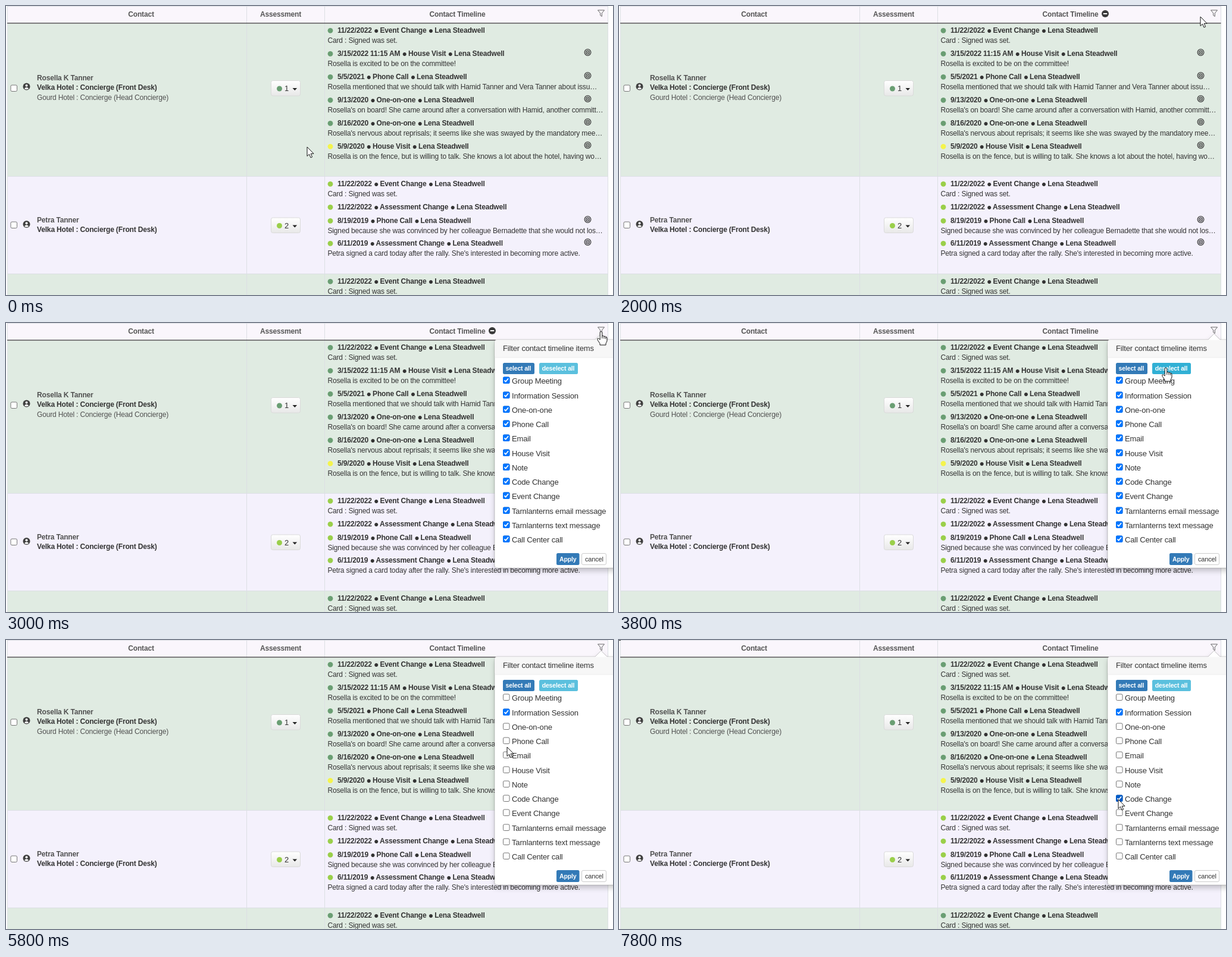
Write an HTML page that moves like this. It is 1020 by 486 pixels and loops after 8 s.

```html
<!DOCTYPE html>
<html lang="en">
<head>
<meta charset="utf-8">
<title>Contact timeline</title>
<style>
  html, body { margin: 0; width: 100%; height: 100%; overflow: hidden; background: #fff; }
  svg { display: block; }
  text { font: 12px "Liberation Sans", Arial, sans-serif; letter-spacing: -.16px; fill: #333; white-space: pre; }
  .b { font-weight: bold; }
  .grey { fill: #505050; }
  .mid { font-size: 13px; }
  .small { font-size: 11px; }
  .label { font-size: 10.5px; font-weight: bold; fill: #fff; text-anchor: middle; }
  .head { font-weight: bold; fill: #555; text-anchor: middle; }
  .bullet { font-size: 14px; letter-spacing: -1.2px; baseline-shift: -.8px; }
</style>
</head>
<body>
<svg id="stage" width="1020" height="486" viewBox="0 0 1020 486"></svg>
<script>
const GREEN = '#6a9e73', LIME = '#9acf4a', YELLOW = '#f4f44c';
const HOST = 'Lena Steadwell';

const rect = (x, y, w, h, fill, more = '') =>
  `<rect x="${x}" y="${y}" width="${w}" height="${h}" fill="${fill}" ${more}/>`;
const dot = (x, y, r, fill, more = '') => `<circle cx="${x}" cy="${y}" r="${r}" fill="${fill}" ${more}/>`;
const path = (d, fill, more = '') => `<path d="${d}" fill="${fill}" ${more}/>`;
const text = (x, y, s, cls = '') => `<text x="${x}" y="${y}" class="${cls}">${s}</text>`;
const group = (id, body) => `<g id="${id}">${body}</g>`;

const target = (x, y) => dot(x, y, 5.3, 'none', 'stroke="#3c3c3c" stroke-width="1.3"') +
  dot(x, y, 2.9, 'none', 'stroke="#3c3c3c" stroke-width="1.3"') + dot(x, y, 1.2, '#3c3c3c');
const badge = (x, y, plus) => dot(x, y, 6, '#3a3a3a') +
  path(`M${x - 3.2} ${y}h6.4` + (plus ? `M${x} ${y - 3.2}v6.4` : ''), 'none', 'stroke="#fff" stroke-width="2"');
const person = (x, y) => dot(x, y, 6, '#3f3f3f') + dot(x, y - 1.8, 2, '#fff') +
  path(`M${x - 3.6} ${y + 3.4}q3.6 -4.4 7.2 0q-3.6 2.6 -7.2 0z`, '#fff');
const box = (x, y) => rect(x - 5, y - 5, 10.5, 10.5, '#fff', 'rx="2" stroke="#767676"');

// Entry: baseline, dot colour, date, kind, note, has target icon
const entries = [
  [45, GREEN, '11/22/2022', 'Event Change', 'Card : Signed was set.'],
  [84, GREEN, '3/15/2022 11:15 AM', 'House Visit', 'Rosella is excited to be on the committee!', 1],
  [123, GREEN, '5/5/2021', 'Phone Call', 'Rosella mentioned that we should talk with Hamid Tanner and Vera Tanner about issu…', 1],
  [162, GREEN, '9/13/2020', 'One-on-one', "Rosella's on board! She came around after a conversation with Hamid, another committ…", 1],
  [201, GREEN, '8/16/2020', 'One-on-one', "Rosella's nervous about reprisals; it seems like she was swayed by the mandatory mee…", 1],
  [240, YELLOW, '5/9/2020', 'House Visit', 'Rosella is on the fence, but is willing to talk. She knows a lot about the hotel, having wo…', 1],
  [303, LIME, '11/22/2022', 'Event Change', 'Card : Signed was set.'],
  [342, LIME, '11/22/2022', 'Assessment Change', ''],
  [365, LIME, '8/19/2019', 'Phone Call', 'Signed because she was convinced by her colleague Bernadette that she would not los…', 1],
  [403, LIME, '6/11/2019', 'Assessment Change', "Petra signed a card today after the rally. She's interested in becoming more active.", 1],
  [467, GREEN, '11/22/2022', 'Event Change', 'Card : Signed was set.'],
];
const entry = ([y, color, date, kind, note, icon]) =>
  dot(545, y - 3.7, 4.4, color) +
  text(557, y, [date, kind, HOST].join(' <tspan class="bullet">●</tspan> '), 'b') +
  text(540.5, y + 17, note) + (icon ? target(977.5, y - 6) : '');

const rating = (y, color, n) =>
  rect(445.5, y - 13, 49, 25.5, 'url(#btn)', 'rx="3" stroke="#dadada"') + dot(459.5, y + .5, 4.5, color) +
  text(468, y + 4.5, n, 'mid') + path(`M481.5 ${y - .5}h7.6l-3.8 4z`, '#222');

const table =
  rect(2, 0, 1009.5, 28, '#faf6fc') + rect(2, 30, 1009.5, 257, '#e0ebe2') +
  rect(2, 287, 1009.5, 163, '#f4f1fc') + rect(2, 450, 1009.5, 36, '#e0ebe2') +
  path('M2.5 0V486M404.5 0V486M535.5 0V486M1011.5 0V486M2 .5H1011M2 286.5H1011M2 450.5H1011', 'none', 'stroke="#dcdfe4"') +
  rect(2, 28, 1009.5, 1.7, '#666') +
  text(227, 18, 'Contact', 'head') + text(461.5, 18, 'Assessment', 'head') + text(758.5, 18, 'Contact Timeline', 'head') +
  path('M994.5 7H1005.5L1001.3 12V17.5L998.7 15.8V12Z', 'none', 'stroke="#666"') +
  box(13, 138) + person(34.5, 135.5) +
  text(52, 125, 'Rosella K Tanner', 'b grey') + text(52, 141, 'Velka Hotel : Concierge (Front Desk)', 'b') +
  text(52, 158, 'Gourd Hotel : Concierge (Head Concierge)', 'grey') +
  box(13, 368) + person(34.5, 367) +
  text(52, 364, 'Petra Tanner', 'b grey') + text(52, 380, 'Velka Hotel : Concierge (Front Desk)', 'b') +
  rating(138.5, GREEN, 1) + rating(369, LIME, 2);

const edge = 'stroke="#000" stroke-opacity=".2"';
const note =
  path('M288 125.5H526q4 0 4 4V162L540 172L530 182V222q0 4 -4 4H288q-4 0 -4 -4V129.5q0 -4 4 -4z', '#fff', edge + ' filter="url(#shade)"') +
  rect(284.5, 126, 245, 26, '#f7f7f7', 'rx="3"') + rect(284.5, 152, 245, 1, '#ebebeb') +
  text(297, 144, 'One-on-one — 9/13/2020', 'mid') +
  ["Rosella's on board! She came around", 'after a conversation with Hamid,', 'another committee in her department.']
    .map((s, i) => text(297, 176 + 18 * i, s, 'mid')).join('');

const kinds = ['Group Meeting', 'Information Session', 'One-on-one', 'Phone Call', 'Email', 'House Visit', 'Note',
  'Code Change', 'Event Change', 'Tarnlanterns email message', 'Tarnlanterns text message', 'Call Center call'];
const rowY = i => Math.round(96.3 + 24.27 * i);
const tick = (i, y) => group('tick' + i, rect(835, y - 5.5, 11.5, 11.5, '#0075ff', 'rx="2"') +
  path(`M837.5 ${y + .3}l2.2 2.4l4.4 -5.4`, 'none', 'stroke="#fff" stroke-width="1.8"'));
const filter =
  path('M825 28H990L1000 18L1010 28H1030V412H825q-4 0 -4 -4V32q0 -4 4 -4z', '#fff', edge + ' filter="url(#shade)"') +
  rect(821.5, 28.5, 199, 29, '#f7f7f7', 'rx="3"') + rect(821.5, 57.5, 199, 1, '#ebebeb') +
  text(835, 47, 'Filter contact timeline items', 'mid') +
  rect(835, 67, 53, 19, '#337ab7', 'rx="2.5"') + text(861, 80, 'select all', 'label') +
  rect(896, 67, 65, 19, '#5bc0de', 'rx="2.5" id="deselect"') + text(928, 80, 'deselect all', 'label') +
  kinds.map((s, i) => box(840.5, rowY(i)) + tick(i, rowY(i)) + text(850, rowY(i) + 6, s, 'mid')).join('') +
  rect(925, 387, 38.5, 20, '#337ab7', 'rx="2.5"') + text(944.3, 401, 'Apply', 'label') +
  rect(967.5, 387.5, 41, 19, '#fff', 'rx="2.5" stroke="#ccc"') + text(973, 401, 'cancel', 'small');

const pen = 'stroke="#111" stroke-width="1" stroke-linejoin="round"';
const arrow = path('M0 0V15.5L3.6 12.2L6 18L8.6 16.9L6.2 11.3H11Z', '#fff', pen);
const hand = path('M-1.8 1.5Q0 -1 1.8 1.5V8Q4 6.8 5 8.6Q7 7.6 7.8 9.4Q10 9 10 11.5V16Q9.4 18.5 8 20V23H-2V20.5L-6 14.5Q-7.2 11.5 -4.4 11.8L-1.8 14Z', '#fff', pen) +
  path('M1.8 8V12M5 8.6V12.4M7.8 9.4V12.8', 'none', pen);

const stage = document.getElementById('stage');
stage.innerHTML = `<defs>
  <linearGradient id="btn" x2="0" y2="1"><stop stop-color="#fff"/><stop offset="1" stop-color="#e8e8e8"/></linearGradient>
  <filter id="shade" x="-10%" y="-10%" width="120%" height="125%"><feDropShadow dx="0" dy="5" stdDeviation="4.5" flood-opacity=".2"/></filter>
  </defs>` + table + rect(537, 0, 471, 37, '#dce5dc', 'id="glow"') + entries.map(entry).join('') +
  group('remove', badge(0, 0)) + group('add', badge(998.5, 275, true)) + group('hide', badge(817, 13)) +
  group('note', note) + group('filter', filter) + rect(0, 0, 3, 1, '#333', 'id="speck"') +
  group('cursor', group('arrow', arrow) + group('hand', hand));

const el = id => document.getElementById(id);
const show = (id, on) => el(id).setAttribute('visibility', on ? 'inherit' : 'hidden');

// Pointer stops: time, x, y
const stops = [[0, 506, 237], [600, 612, 178], [1300, 612, 178], [2000, 977, 18], [2300, 1000, 14], [3000, 1000, 14],
  [3600, 919, 75], [4400, 919, 75], [5000, 841, 118], [5400, 841, 118], [5800, 842, 180], [7200, 838, 267],
  [7600, 838, 267], [7800, 839, 268], [8000, 839, 268]];

function pointer(t) {
  const i = stops.findIndex(s => s[0] > t);
  const [t0, x0, y0] = stops[i - 1], [t1, x1, y1] = stops[i];
  const p = (t - t0) / (t1 - t0), k = p * p * (3 - 2 * p);
  return [x0 + (x1 - x0) * k, y0 + (y1 - y0) * k];
}

function draw() {
  const t = Math.floor(performance.now() % 8000 / 200) * 200;
  const [x, y] = pointer(t);
  const open = t >= 2800, inColumn = x > 535 && !open;
  const hovered = inColumn && entries.slice(0, 6).find(e => y >= e[0] - 15 && y < e[0] + 24);
  const onDeselect = open && x > 896 && x < 961 && y > 67 && y < 86;

  el('note').setAttribute('opacity', t === 800 ? .25 : t === 1000 || t === 1200 ? 1 : 0);
  el('filter').setAttribute('opacity', !open ? 0 : t === 2800 ? .3 : 1);
  el('deselect').setAttribute('fill', onDeselect && t >= 3800 ? '#31b0d5' : '#5bc0de');

  show('glow', hovered);
  show('remove', hovered);
  if (hovered) {
    el('glow').setAttribute('y', hovered[0] - 14);
    el('remove').setAttribute('transform', `translate(995.5 ${hovered[0] - 5})`);
  }
  show('add', inColumn && y > 30 && y < 287);
  show('hide', x > 535 && y < 28);

  kinds.forEach((_, i) => {
    show('tick' + i, t < 4200 || (i === 1 && t >= 5000) || (i === 7 && t >= 7400));
    const over = Math.abs(x - 840.5) < 6 && Math.abs(y - rowY(i)) < 6;
    el('tick' + i).firstChild.setAttribute('fill', over ? '#005cc8' : '#0075ff');
  });

  const pointing = hovered || onDeselect || (x > 990 && y < 28);
  show('hand', pointing);
  show('arrow', !pointing);
  show('speck', t >= 7600);
  el('cursor').setAttribute('transform', `translate(${x} ${y})`);
  requestAnimationFrame(draw);
}
draw();
</script>
</body>
</html>
```
